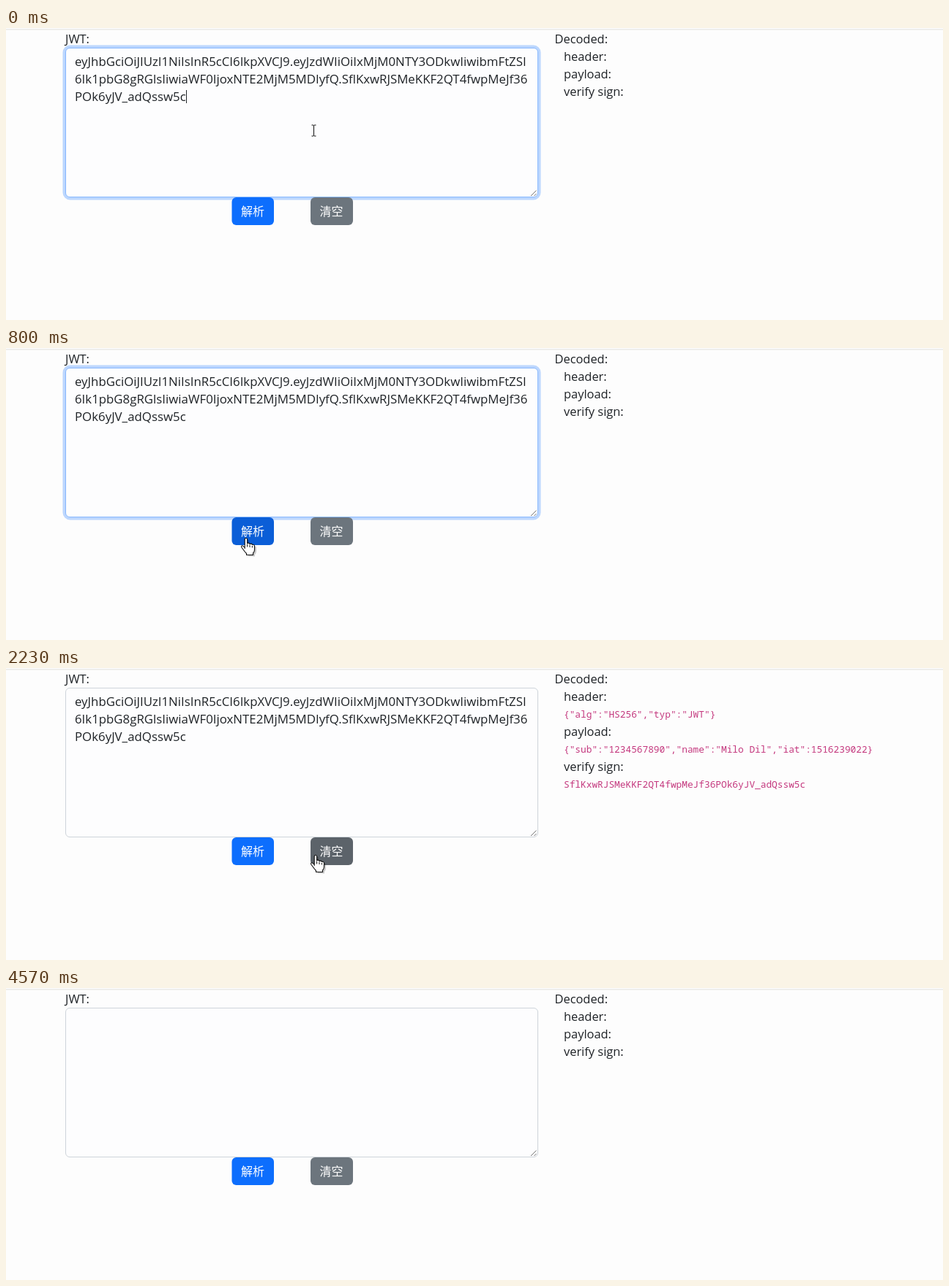
Write an HTML page that moves like this. It is 1280 px wide and 400 px high and loops after 4610 ms.

```html
<!DOCTYPE html>
<html lang="zh">
<head>
<meta charset="utf-8">
<title>JWT decoder</title>
<style>
  html, body { margin: 0; width: 100%; height: 100%; overflow: hidden; background: #fdfdfd; }
  svg { display: block; width: 1280px; height: 400px; }
  text { white-space: pre; }
  .label, .token { font-family: "Open Sans", "Noto Sans", sans-serif; fill: #1e2226; }
  .label { font-size: 16.4px; }
  .token { font-size: 16.82px; }
  .code { font: 12.8px "Noto Sans Mono", "DejaVu Sans Mono", monospace; fill: #c4387e; }
  .button { font: 16px "Noto Sans CJK SC", "Noto Sans CJK", sans-serif; fill: #fff; text-anchor: middle; }
</style>
</head>
<body>
<svg viewBox="0 0 1280 400">
  <rect width="1280" height="400" fill="#fdfdfd"/>
  <rect y="1" width="1280" height="2" fill="#eeeeec"/>

  <text class="label" x="81" y="21">JWT:</text>
  <rect id="ring" x="79.5" y="25.5" width="649" height="208" rx="8" fill="none" stroke="#0d6efd" stroke-width="4"/>
  <rect id="box" x="81.5" y="27.5" width="645" height="204" rx="5.5" fill="#fdfdfe"/>
  <path d="M717 230l7.5-7.5M721.5 230l3-3" stroke="#777" fill="none"/>
  <g id="token" class="token">
    <text x="94" y="52">eyJhbGciOiJIUzI1NiIsInR5cCI6IkpXVCJ9.eyJzdWIiOiIxMjM0NTY3ODkwIiwibmFtZSI</text>
    <text x="94" y="76">6Ik1pbG8gRGlsIiwiaWF0IjoxNTE2MjM5MDIyfQ.SflKxwRJSMeKKF2QT4fwpMeJf36</text>
    <text id="lastLine" x="94" y="100">POk6yJV_adQssw5c</text>
  </g>
  <path id="caret" d="M0 85v18" stroke="#212529"/>

  <rect id="parse" x="308.5" y="232" width="57.5" height="38" rx="6"/>
  <text class="button" x="337" y="257">解析</text>
  <rect id="clear" x="416" y="232" width="58" height="38" rx="6"/>
  <text class="button" x="444.5" y="257">清空</text>

  <text class="label" x="749.5" y="21">Decoded:</text>
  <text class="label" x="762" y="45">header:</text>
  <text class="label" id="payload" x="762">payload:</text>
  <text class="label" id="verify" x="762">verify sign:</text>
  <g id="decoded" class="code">
    <text x="762" y="68">{"alg":"HS256","typ":"JWT"}</text>
    <text x="762" y="116">{"sub":"1234567890","name":"Milo Dil","iat":1516239022}</text>
    <text x="762" y="164">SflKxwRJSMeKKF2QT4fwpMeJf36POk6yJV_adQssw5c</text>
  </g>

  <g id="cursor">
    <path id="beam" d="M-3-7.5h2.5l.5.5.5-.5H3M0-7V7M-3 7.5h2.5L0 7l.5.5H3" fill="none" stroke="#111"/>
    <path id="arrow" d="M0 0v17l4-4 3 6.5 3-1.3-3-6.2h5.5z" fill="#fff" stroke="#111" stroke-linejoin="round"/>
    <g id="hand" stroke-linejoin="round">
      <path id="handShadow" fill="#000" opacity=".2" transform="translate(2.5 2)"/>
      <path id="handShape" fill="#fff" stroke="#111" stroke-width="1.1"/>
      <path d="M2.1 8v4M5.5 9v3.5M8.9 10.5v2.5" stroke="#111" fill="none"/>
    </g>
  </g>
</svg>
<script>
const LOOP = 4610;
const FADE = 150;
const BLUR = 790, DECODE = 880, CLEAR = 2830, LEAVE = 3150;
const PARSE_HOVER = [355, 1675];
const CLEAR_HOVER = [1882, LEAVE];
// Pointer hotspot: time, x, y
const PATH = [[60, 420.5, 140.5], [500, 327.5, 260.5], [1450, 327.5, 260.5],
              [1980, 422.5, 256.5], [2230, 422.5, 256.5], [2800, 452, 247.5]];

const $ = id => document.getElementById(id);
const clamp = v => Math.max(0, Math.min(1, v));
const smooth = v => v * v * (3 - 2 * v);
const lerp = (a, b, k) => a + (b - a) * k;
const fadeAt = (t, start) => smooth(clamp((t - start) / FADE));
const show = (id, on) => $(id).setAttribute("visibility", on ? "visible" : "hidden");
const mix = (a, b, k) => `rgb(${a.map((v, i) => Math.round(lerp(v, b[i], k)))})`;

const handPath = "M-1.3 14V1.5Q-1.3 0 .3 0T2.1 1.5V7Q4.5 5.800 5.5 8" +
  "Q8 6.8 8.9 9Q12 8.2 12 11V16Q12 18.5 10 20.5V23H1V21" +
  "Q-1.5 18.5-3.5 15.5L-5.7 12.5Q-6.5 10.8-5 10.3Q-3.7 10-1.3 13Z";
$("handShadow").setAttribute("d", handPath);
$("handShape").setAttribute("d", handPath);

function pointerAt(t) {
  const next = PATH.findIndex(p => p[0] > t);
  if (next === 0) return PATH[0].slice(1);
  if (next < 0) return PATH[PATH.length - 1].slice(1);
  const [t0, x0, y0] = PATH[next - 1], [t1, x1, y1] = PATH[next];
  const k = smooth((t - t0) / (t1 - t0));
  return [lerp(x0, x1, k), lerp(y0, y1, k)];
}

function paintButton(id, t, [enter, leave], normal, hover) {
  $(id).setAttribute("fill", mix(normal, hover, fadeAt(t, enter) - fadeAt(t, leave)));
}

function render(t) {
  const focus = 1 - fadeAt(t, BLUR);
  $("ring").setAttribute("opacity", 0.27 * focus);
  $("box").setAttribute("stroke", mix([206, 212, 218], [134, 183, 254], focus));
  show("token", t < CLEAR);
  show("caret", t < 530);

  const decoded = t >= DECODE && t < CLEAR;
  show("decoded", decoded);
  $("payload").setAttribute("y", decoded ? 93 : 69);
  $("verify").setAttribute("y", decoded ? 141 : 93);

  paintButton("parse", t, PARSE_HOVER, [13, 110, 253], [11, 94, 215]);
  paintButton("clear", t, CLEAR_HOVER, [108, 117, 125], [92, 99, 106]);

  const [x, y] = pointerAt(t);
  const inBox = y < 232;
  const onButton = !inBox && (x < 366 || x > 416);
  const present = t < LEAVE;
  $("cursor").setAttribute("transform", `translate(${x} ${y})`);
  show("beam", present && inBox);
  show("hand", present && onButton);
  show("arrow", present && !inBox && !onButton);
}

const caretX = Math.round(94 + $("lastLine").getComputedTextLength()) + 0.5;
$("caret").setAttribute("transform", `translate(${caretX} 0)`);

const start = performance.now();
function tick() {
  render((performance.now() - start) % LOOP);
  requestAnimationFrame(tick);
}
tick();
</script>
</body>
</html>
```
